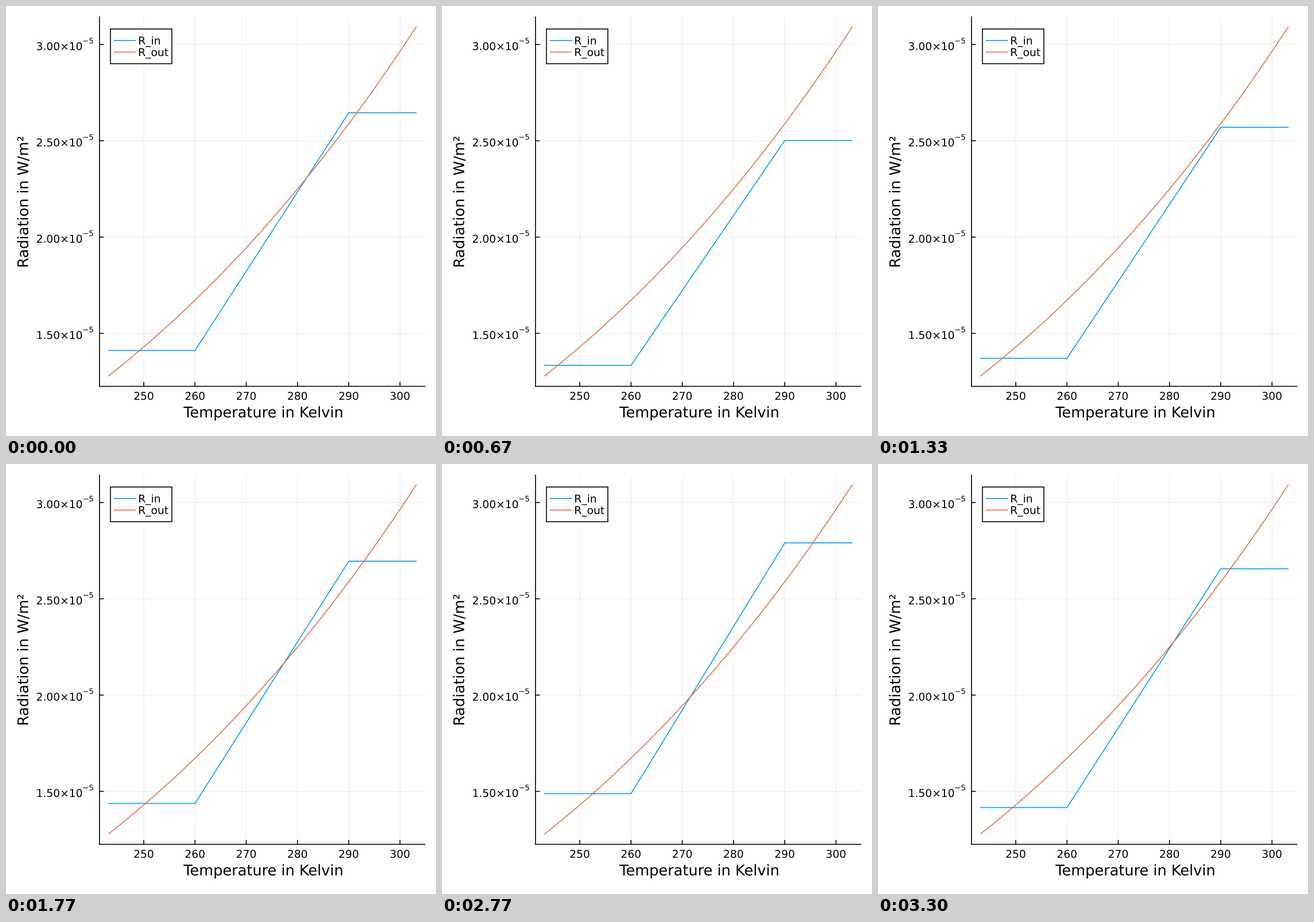
Animation of 749 by 748 pixels, one loop 3330 ms. Source, as a matplotlib script:

```python
import math

import numpy as np
import matplotlib.pyplot as plt
from matplotlib.animation import FuncAnimation
from matplotlib.patches import PathPatch, Rectangle
from matplotlib.textpath import TextPath
from matplotlib.transforms import Affine2D

W, H, DPI = 749, 748, 128
STEPS = 100          # distinct poses per loop
TICKS = 333          # 10 ms clock ticks per loop
BLUE, ORANGE = "#009afa", "#e36f47"
LEFT, RIGHT, TOP, BOTTOM = 162.8, 730.6, 18.4, 661.6
SMALL, LARGE = 18.67, 25.6
T_MIN, T_MAX = 243.15, 303.15

fig = plt.figure(figsize=(W / DPI, H / DPI), dpi=DPI, facecolor="white")
ax = fig.add_axes([0, 0, 1, 1])
ax.set_xlim(0, W)
ax.set_ylim(H, 0)
ax.set_axis_off()


def px(temp):
    return 240 + (temp - 250) * 8.926


def py(rad):
    """Pixel row of a radiation value given in 1e-5 W/m²."""
    return 67 + (3 - rad) * 335


def line(x, y, color="black", width=1.6, cap="butt", z=2, **kw):
    return ax.plot(x, y, color=color, lw=width * 72 / DPI, snap=False,
                   solid_capstyle=cap, solid_joinstyle="miter",
                   zorder=z, **kw)[0]


def text(s, x, y, size, center=False, angle=0):
    path = TextPath((0, 0), s, size=size, prop={"family": "DejaVu Sans"})
    shift = 0
    if center:
        box = path.get_extents()
        shift = -(box.x0 + box.x1) / 2
    move = (Affine2D().translate(shift, 0).scale(1, -1)
            .rotate_deg(-angle).translate(x, y))
    ax.add_patch(PathPatch(move.transform_path(path), fc="black", lw=0,
                           zorder=6))


def draw_axes():
    for temp in range(250, 301, 10):
        x = px(temp)
        line([x, x], [TOP, BOTTOM], width=0.8, z=1, alpha=0.1)
        line([x, x], [BOTTOM, BOTTOM - 7.6])
        text(str(temp), x, 685, SMALL, center=True)
    for rad in (1.5, 2.0, 2.5, 3.0):
        y = py(rad)
        line([LEFT, RIGHT], [y, y], width=0.8, z=1, alpha=0.1)
        line([LEFT, LEFT + 7.6], [y, y])
        text(f"{rad:.2f}×10", 52.5, y + 9.7, SMALL)
        text("\u22125", 133.4, y - 2, SMALL * 0.7)
    line([LEFT, LEFT, RIGHT], [TOP, BOTTOM, BOTTOM])
    text("Temperature in Kelvin", 447.3, 715.6, LARGE, center=True)
    text("Radiation in W/m²", 38.6, 340.3, LARGE, center=True, angle=90)


def draw_legend():
    ax.add_patch(Rectangle((181.9, 40), 107, 60.4, fc="white", ec="black",
                           lw=1.6 * 72 / DPI, snap=False, zorder=4))
    rows = (("R_in", BLUE, 60.1), ("R_out", ORANGE, 80.2))
    for name, color, y in rows:
        line([188.4, 225.7], [y, y], color, cap="projecting", z=5)
        text(name, 230.2, y + 6.8, SMALL)


draw_axes()
draw_legend()

temps = np.linspace(T_MIN, T_MAX, 121)
r_in = line([px(t) for t in (T_MIN, 260, 290, T_MAX)], [0] * 4, BLUE,
            cap="projecting", z=2.5)
line(px(temps), py(3.66e-10 * temps ** 4), ORANGE, cap="projecting", z=3)


def update(tick):
    step = (3 * tick + 1) // 10 + 1
    high = 2.6557 * (1 - 0.06 * math.sin(2 * math.pi * step / STEPS))
    low = high * 8 / 15
    r_in.set_ydata([py(low), py(low), py(high), py(high)])
    return (r_in,)


anim = FuncAnimation(fig, update, frames=TICKS, interval=10, repeat=True,
                     repeat_delay=0)
plt.show()
```
